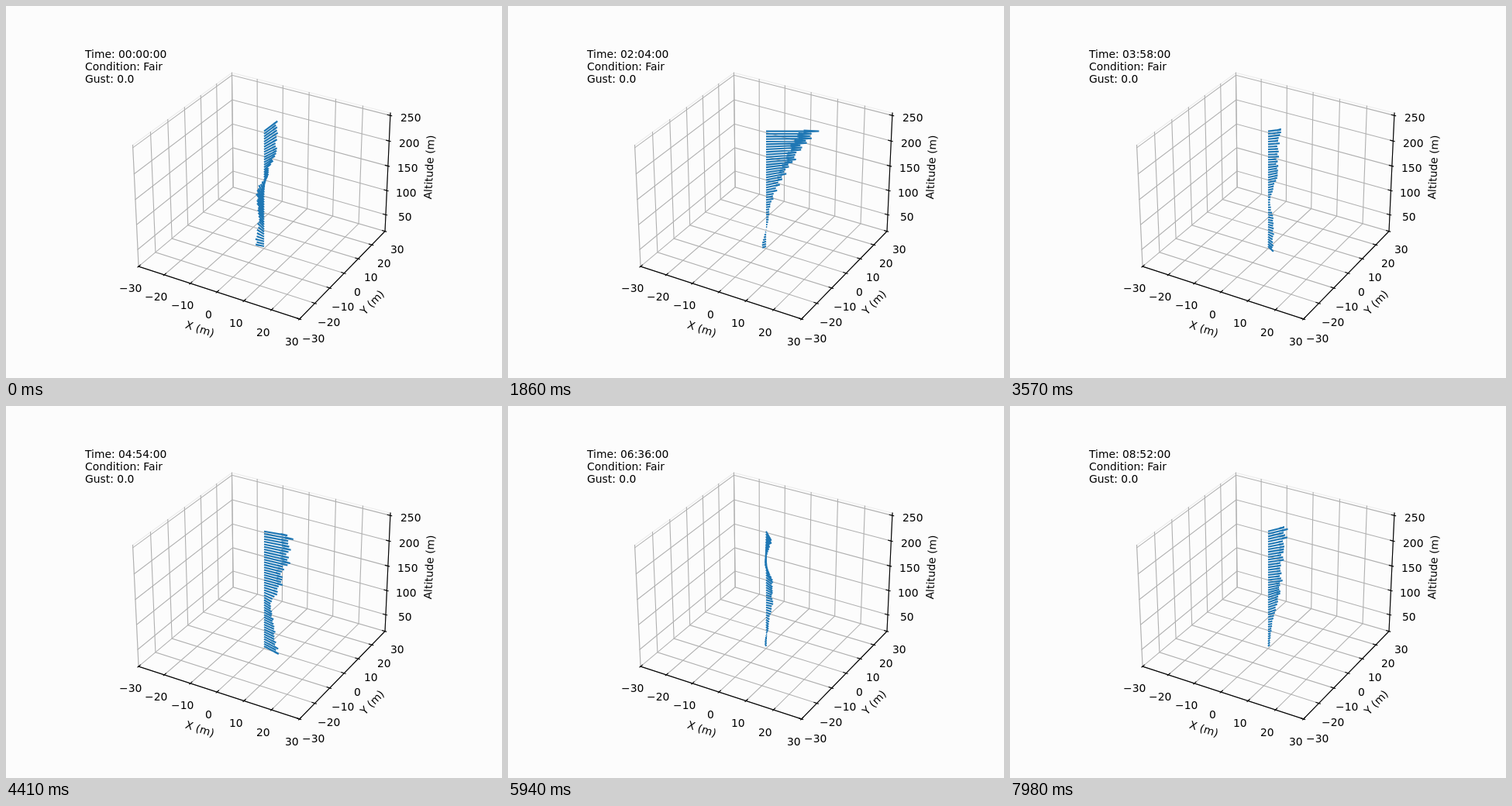
Animation, 640 px wide and 480 px high, one loop 8 s. Source, as an HTML page with a canvas:

```html
<!DOCTYPE html>
<html lang="en">
<head>
<meta charset="utf-8">
<title>Wind profile</title>
<style>
html, body { margin: 0; width: 100%; height: 100%; overflow: hidden; background: #fcfcfc; }
canvas { display: block; width: 640px; height: 480px; }
</style>
</head>
<body>
<canvas id="stage" width="640" height="480"></canvas>
<script>
const ctx = document.getElementById('stage').getContext('2d');
const LOOP = 8000, STEP = 30;
const Z0 = 15.2, Z1 = 254.8, R = 30;
const LOW = 20, HIGH = 250;
const FONT = '13.89px "DejaVu Sans", sans-serif';

const lerp = (a, b, k) => a + (b - a) * k;
const mix = (p, q, k) => p.map((a, i) => lerp(a, q[i], k));
const ease = k => k * k * (3 - 2 * k);

// Perspective camera: elevation 30, azimuth -60, distance 10.
function project(x, y, z) {
  const a = x / R * 0.5953, b = y / R * 0.5953;
  const c = ((z - Z0) / (Z1 - Z0) * 2 - 1) * 0.4464;
  const depth = 10 - (0.433 * a - 0.75 * b + 0.5 * c);
  const u = (0.866 * a + 0.5 * b) / depth;
  const v = (-0.25 * a + 0.433 * b + 0.866 * c) / depth;
  return [143.2 + (u + 0.095) * 1997.8, 427.2 - (v + 0.095) * 1997.8];
}

function line(color, ...points) {
  ctx.strokeStyle = color;
  ctx.lineWidth = 1.11;
  ctx.lineCap = 'square';
  ctx.beginPath();
  points.forEach(p => ctx.lineTo(...project(...p)));
  ctx.stroke();
}

const grid = (...points) => line('#b0b0b0', ...points);
const axis = (...points) => line('#000', ...points);

// Tick labels sit on whole pixels, centred on x and y.
function number(n, x, y) {
  const str = String(n).replace('-', '\u2212');
  ctx.fillText(str, Math.round(x - ctx.measureText(str).width / 2), Math.round(y + 5));
}

function title(str, x, y, angle) {
  ctx.save();
  ctx.translate(x, y);
  ctx.rotate(angle * Math.PI / 180);
  ctx.fillText(str, -ctx.measureText(str).width / 2, 4);
  ctx.restore();
}

function drawAxes() {
  line('#ededed', [-R, -R, Z0], [-R, -R, Z1], [-R, R, Z1], [R, R, Z1]);
  for (let t = -R; t <= R; t += 10) {
    grid([t, -R, Z0], [t, R, Z0], [t, R, Z1]);
    grid([R, t, Z0], [-R, t, Z0], [-R, t, Z1]);
  }
  for (let z = 50; z <= HIGH; z += 50) grid([-R, -R, z], [-R, R, z], [R, R, z]);

  axis([-R, -R, Z0], [R, -R, Z0], [R, R, Z0], [R, R, Z1]);
  for (let t = -R; t <= R; t += 10) {
    axis([t, -R - 0.5, Z0], [t, -R + 1, Z0]);
    axis([R + 0.5, t, Z0], [R - 1, t, Z0]);
    const k = (t + R) / (2 * R);
    const [ax, ay] = project(t, -R, Z0);
    const [bx, by] = project(R, t, Z0);
    number(t, ax - 10.3, ay + lerp(28, 29, k));
    number(t, bx + lerp(18, 16, k), by + lerp(25, 23, k));
  }
  for (let z = 50; z <= HIGH; z += 50) {
    axis([R + 0.5, R, z], [R - 1, R, z]);
    const [x, y] = project(R, R, z);
    number(z, x + lerp(24.5, 26, (z - 50) / 200), y + 3);
  }
  title('X (m)', 250, 417.5, 18.1);
  title('Y (m)', 473, 383, -45.8);
  title('Altitude (m)', 547, 208, -87.4);
}

// Each profile holds a few wind vectors, evenly spaced from top to bottom.
const profiles = [
  { time: 0, wind: [[16, -12], [16, -8], [5, -7], [-9, -13], [-7, -8], [-10, -2]] },
  { time: 1050, wind: [[-7, 9], [2, 2], [-2, 2], [-3, 3], [-3, 2], [-6, 1]] },
  { time: 2730, wind: [[0, -10], [-5, -8], [0, -11], [-3, -6], [2, -2], [-5, 3]] },
  { time: 4410, wind: [[33, 6], [30, 7], [22, 6], [8, 5], [13, 6], [17, 9]] },
  { time: 5940, wind: [[6, 11], [-1, 11], [8, 6], [8, 2], [3, 3], [-1, -4]] },
  { time: 7170, wind: [[20, -7], [19, -4], [6, -3], [4, -2], [7, -2], [5, -1]] },
  { time: 7980, wind: [[24, -6], [18, -3], [17, -2], [14, -5], [5, -1], [2, -2]] }
];

function sample(wind, fall) {
  const pos = fall * (wind.length - 1);
  const i = Math.min(wind.length - 2, Math.floor(pos));
  return mix(wind[i], wind[i + 1], ease(pos - i));
}

function random(seed) {
  const n = Math.sin(seed * 12.9898) * 43758.5453;
  return n - Math.floor(n);
}

function arrow(x, y, dx, dy) {
  const spread = Math.hypot(dx, dy) * 0.0142;
  const tx = x + dx, ty = y + dy;
  ctx.moveTo(x, y);
  ctx.lineTo(tx, ty);
  for (const s of [-spread, spread]) {
    ctx.moveTo(tx, ty);
    ctx.lineTo(tx - dx * 0.29, ty - dy * 0.29 + s);
  }
}

function drawWind(time) {
  const i = Math.max(1, profiles.findIndex(p => p.time >= time));
  const from = profiles[i - 1], to = profiles[i];
  const k = (time - from.time) / (to.time - from.time);
  const surge = 66 * Math.exp(-(((time - 1880) / 370) ** 2));

  ctx.strokeStyle = '#1f77b4';
  ctx.lineWidth = 2.08;
  ctx.lineCap = 'butt';
  ctx.beginPath();
  for (let z = LOW; z <= HIGH; z += 5) {
    const fall = (HIGH - z) / (HIGH - LOW);
    const [dx, dy] = mix(sample(from.wind, fall), sample(to.wind, fall), k);
    const wobble = 0.85 + 0.3 * random(z + time);
    const push = surge * (1 - fall) ** 2;
    arrow(...project(0, 0, z), (dx + push) * wobble, dy * wobble);
  }
  ctx.stroke();
}

function drawInfo(minutes) {
  const two = n => String(n).padStart(2, '0');
  ctx.fillText(`Time: ${two(Math.floor(minutes / 60))}:${two(minutes % 60)}:00`, 102, 67);
  ctx.fillText('Condition: Fair', 102, 83);
  ctx.fillText('Gust: 0.0', 102, 99);
}

function draw(now) {
  const step = Math.floor((now % LOOP) / STEP);
  ctx.fillStyle = '#fcfcfc';
  ctx.fillRect(0, 0, 640, 480);
  ctx.font = FONT;
  ctx.fillStyle = '#000';
  drawAxes();
  drawWind(step * STEP);
  drawInfo(step * 2);
}

const start = performance.now();
function tick() {
  draw(performance.now() - start);
  requestAnimationFrame(tick);
}
tick();
</script>
</body>
</html>
```
